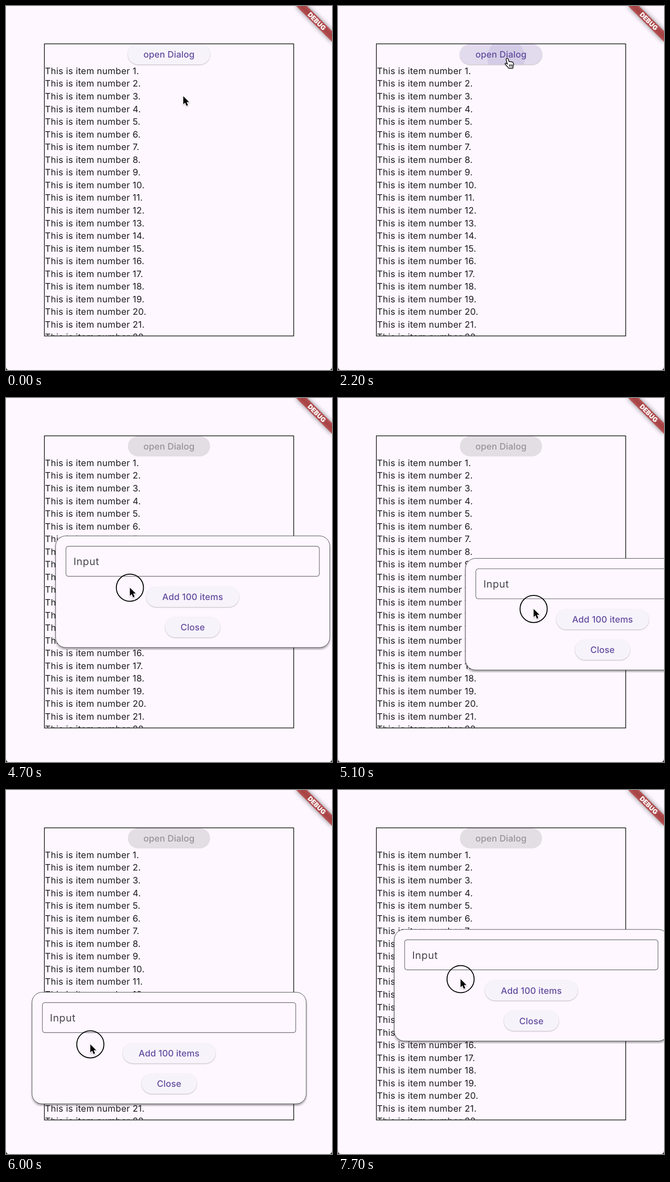
Write an HTML page that moves like this. It is 708 px wide and 791 px high and loops after 8000 ms.

```html
<!DOCTYPE html>
<html lang="en">
<head>
<meta charset="utf-8">
<title>Draggable dialog</title>
<style>
  html, body { margin: 0; width: 100%; height: 100%; overflow: hidden; background: #fef7ff; }
  svg { display: block; width: 708px; height: 791px; }
  text { font-family: Inter, "Open Sans", sans-serif; font-size: 19.25px; text-rendering: geometricPrecision; white-space: pre; }
  .item { fill: #1d1b20; letter-spacing: .34px; }
  .label { font-weight: 500; letter-spacing: .14px; text-anchor: middle; fill: #624c9e; }
  .pill { fill: #f7f3fb; }
  .raised { filter: drop-shadow(0 1.2px 1px rgba(0, 0, 0, .28)); }
  .pointer { filter: drop-shadow(0 1.5px 1.2px rgba(0, 0, 0, .3)); }
</style>
</head>
<body>
<svg viewBox="0 0 708 791" xmlns="http://www.w3.org/2000/svg">
  <defs>
    <clipPath id="listClip"><rect x="83" y="82" width="542" height="634.6"/></clipPath>
    <clipPath id="pillClip"><rect x="264.7" y="83" width="178.5" height="44" rx="22"/></clipPath>
    <clipPath id="shadowClip"><rect x="-5" y="-2" width="605.5" height="250"/></clipPath>
    <filter id="blur" x="-30%" y="-150%" width="160%" height="400%"><feGaussianBlur stdDeviation="5.4"/></filter>
    <filter id="soft" x="-10%" y="-10%" width="120%" height="120%"><feGaussianBlur stdDeviation="2.8"/></filter>
  </defs>

  <rect width="708" height="791" fill="#fef7ff"/>
  <path d="M0 784Q.5 789.5 5 791H0ZM708 784Q707.500 789.500 703 791H708Z" fill="#333"/>

  <g id="list" clip-path="url(#listClip)"></g>
  <rect x="83.4" y="82.3" width="541.4" height="634.7" fill="none" stroke="#000" stroke-width="1.375"/>

  <rect id="openPill" class="pill" x="264.7" y="83" width="178.5" height="44" rx="22"/>
  <g clip-path="url(#pillClip)"><circle id="ripple" cx="365" cy="112" fill="#6750a4"/></g>
  <text id="openLabel" class="label" x="354" y="111.700">open Dialog</text>

  <g id="dialog">
    <g clip-path="url(#shadowClip)">
      <rect y="4" width="595.5" height="242.500" rx="22" fill="#000" opacity=".36" filter="url(#soft)"/>
    </g>
    <rect width="595.5" height="242.5" rx="22" fill="#fef7ff" stroke="#47444a"/>
    <rect id="field" x="22.5" y="22.5" width="550.3" height="65.300" rx="5.5" fill="none" stroke-width="1.375"/>
    <text x="38.8" y="63.700" fill="#49454f" style="font-size:22px;letter-spacing:.69px">Input</text>
    <g class="raised">
      <rect class="pill" x="197" y="110.500" width="201.5" height="44" rx="22"/>
      <rect class="pill" x="238" y="176.500" width="119.5" height="44" rx="22"/>
    </g>
    <text class="label" x="297.700" y="139.500">Add 100 items</text>
    <text class="label" x="297.700" y="205.500">Close</text>
  </g>

  <g transform="translate(708 0) rotate(45)">
    <rect x="-55" y="38.5" width="110" height="16.5" fill="#000" opacity=".5" filter="url(#blur)"/>
    <rect x="-55" y="38.5" width="110" height="16.5" fill="#b71c1c" opacity=".627"/>
    <text y="51.800" fill="#fff" text-anchor="middle" style="font-size:14px;font-weight:900">DEBUG</text>
  </g>

  <g id="cursor">
    <circle id="ring" r="29.5" fill="none" stroke="#000" stroke-width="2"/>
    <path id="arrow" class="pointer" d="M0 0V17.6L4 13.9L7 21L10.200 19.600L7.200 12.700H12.700Z" fill="#000" stroke="#fff" stroke-width="2.400" paint-order="stroke"/>
    <g id="hand" class="pointer" transform="translate(-5 -1)" stroke="#000" stroke-width="1.400" stroke-linecap="round" stroke-linejoin="round">
      <path d="M4 2.500Q5.800 .5 7.800 2.800L10 9Q11.500 7.800 13 9.300Q14.600 8.300 16 9.900Q18.300 9.300 19 11.500Q20.300 15 19 18.500L18 23H9Q6.500 19 3 16Q.5 13.400 1.800 12.500Q3.500 11.500 6.500 14.500L3.700 5Z" fill="#fff"/>
      <path d="M10.800 15.300V19.300M13.700 15.300V19.300M16.600 15.300V19.300" fill="none"/>
    </g>
  </g>
</svg>

<script>
  const LOOP = 8000, STEP = 100;
  const LAG = 30;                       // dialog trails the pointer
  const GRIP = [144, 108];              // grab point inside the dialog
  const PRESS = 2000, OPEN = 2400, GRAB = 4500;

  // drag path of the dialog: time, left, top
  const PATH = [
    [4450, 56.5, 278.5], [4600, 70, 286], [4700, 107.7, 299.7], [4850, 200, 322],
    [5050, 268, 345], [5300, 293, 357.5], [5450, 287, 357.5], [5600, 271, 358.5],
    [5800, 172, 394], [6000, 56.5, 439.5], [6200, -52, 462.5], [6400, -88, 430],
    [6550, -78, 380], [6700, -30.3, 328.8], [6900, 62, 284], [7000, 102, 287],
    [7100, 124, 301.5], [7200, 122.2, 303]
  ];

  const $ = id => document.getElementById(id);
  const clamp = v => Math.max(0, Math.min(1, v));
  const ease = (t, a, b) => { const k = clamp((t - a) / (b - a)); return k * k * (3 - 2 * k); };
  const mix = (a, b, k) => a + (b - a) * k;
  const mixColor = (a, b, k) => `rgb(${a.map((v, i) => Math.round(mix(v, b[i], k)))})`;
  const place = (el, p) => el.setAttribute('transform', `translate(${p[0]} ${p[1]})`);
  const show = (el, on) => el.setAttribute('visibility', on ? 'visible' : 'hidden');

  for (let i = 1; i <= 22; i++) {
    const line = document.createElementNS('http://www.w3.org/2000/svg', 'text');
    line.setAttribute('class', 'item');
    line.setAttribute('x', 84.4);
    line.setAttribute('y', 147.9 + (i - 1) * 27.55);
    line.textContent = `This is item number ${i}.`;
    $('list').append(line);
  }

  function slope(i, axis) {
    const a = PATH[i - 1], b = PATH[i + 1];
    return a && b ? (b[axis] - a[axis]) / (b[0] - a[0]) : 0;
  }

  // smooth curve through the path points
  function dragPos(t) {
    const last = PATH.length - 1;
    if (t <= PATH[0][0]) return PATH[0].slice(1);
    if (t >= PATH[last][0]) return PATH[last].slice(1);
    const i = PATH.findIndex(p => p[0] > t) - 1;
    const a = PATH[i], b = PATH[i + 1], d = b[0] - a[0], s = (t - a[0]) / d;
    return [1, 2].map(n => {
      const h = s * s * (3 - 2 * s);
      return mix(a[n], b[n], h)
        + d * s * (1 - s) * ((1 - s) * slope(i, n) - s * slope(i + 1, n));
    });
  }

  function pointerPos(t) {
    const button = [366.5, 113];
    if (t < OPEN) {
      const k = ease(t, 1200, 1600);
      return [mix(385, button[0], k), mix(196, button[1], k)];
    }
    const grip = dragPos(t + LAG).map((v, i) => v + GRIP[i]);
    const k = ease(t, 3100, 3800);
    return grip.map((v, i) => mix(button[i], v, k));
  }

  function drawButton(t, over) {
    const pill = $('openPill'), label = $('openLabel'), ripple = $('ripple');
    const idle = [247, 243, 251], hover = [236, 230, 244], held = [226, 219, 238];
    const off = [227, 221, 228], ink = [98, 76, 158], dim = [152, 147, 154];
    const press = clamp((t - PRESS + 100) / 300), fade = clamp((t - OPEN + 100) / 400);
    let fill = over ? mixColor(hover, held, press) : mixColor(idle, idle, 0);
    if (t >= OPEN) fill = mixColor(held, off, fade);
    pill.style.fill = fill;
    pill.setAttribute('class', t < OPEN ? 'pill raised' : 'pill');
    label.style.fill = mixColor(ink, dim, fade);
    ripple.setAttribute('r', t < PRESS ? 0 : 41 * press + 60 * fade);
    ripple.setAttribute('opacity', .11 * (1 - fade));
  }

  function draw(time) {
    const t = Math.floor(time / STEP) * STEP;
    const p = pointerPos(t), opened = t >= OPEN;
    const overButton = !opened && p[1] < 127;
    const overField = opened && t < GRAB && p[1] > 301 && p[1] < 366;

    drawButton(t, overButton);
    show($('dialog'), opened);
    place($('dialog'), dragPos(t));
    $('field').setAttribute('stroke', overField ? '#1d1b20' : '#79747e');
    place($('cursor'), p);
    show($('ring'), t >= GRAB);
    show($('hand'), overButton);
    show($('arrow'), !overButton);
  }

  const start = performance.now();
  function tick() {
    draw((performance.now() - start) % LOOP);
    requestAnimationFrame(tick);
  }
  tick();
</script>
</body>
</html>
```
